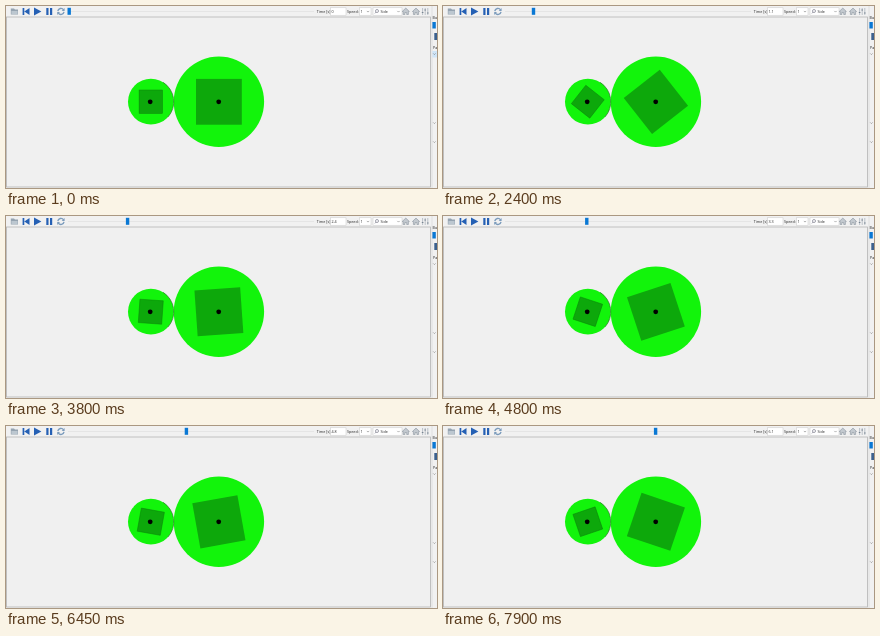
An HTML page for the animation above (8000 ms loop, 431 by 182 pixels).

```html
<!DOCTYPE html>
<html lang="en">
<head>
<meta charset="utf-8">
<title>Gear pair simulation</title>
<style>
  html, body { margin: 0; width: 100%; height: 100%; overflow: hidden; background: #f1f1f1; }
  svg { display: block; width: 431px; height: 182px; }
  text { font: 3.7px "Open Sans", "Noto Sans", sans-serif; fill: #222; }
  .field { fill: #fff; stroke: #c8c8c8; stroke-width: .5; }
  .blue { fill: #2560b4; }
  .soft { fill: #95a3b0; }
  .chevron { fill: none; stroke: #666; stroke-width: .5; }
  .disc { fill: #12f40b; }
  .block { fill: #0da80b; }
</style>
</head>
<body>
<svg viewBox="0 0 431 182">
  <defs>
    <path id="down" class="chevron" d="M-1.2-.6 0 .6 1.2-.6"/>
    <path id="house" d="M0-3.4 3.6 0H2.6V3H.9V1H-.9V3H-2.6V0H-3.6Z" fill="#c3c9cf" stroke="#8b969f" stroke-width=".6"/>
  </defs>

  <!-- viewport -->
  <rect x=".5" y="11" width="424" height="170" fill="#f0f0f0" stroke="#b4b4b4" stroke-width=".8"/>

  <!-- playback buttons -->
  <rect id="hover" x="26" y=".5" width="11" height="10" fill="#cfe5f7"/>
  <path class="soft" d="M4.8 2.5H8L9 3.5H12V8.5H4.8Z"/>
  <path d="M5.4 5H11.6V8H5.4Z" fill="#bcc7d0"/>
  <path class="blue" d="M16.6 2H18.3V9H16.6ZM23.5 2V9L18.3 5.5Z"/>
  <path class="blue" d="M28 1.6 35.4 5.5 28 9.4Z"/>
  <path class="blue" d="M40.3 2H42.5V9H40.3ZM44 2H46.2V9H44Z"/>
  <path d="M51.8 5.2A3.2 3.2 0 0 1 57.6 3.8M58 5.8A3.2 3.2 0 0 1 52.3 7.2" fill="none" stroke="#7c9cbc" stroke-width="1.4"/>
  <path d="M58.6 2V5H55.7ZM51.2 9V6H54Z" fill="#7c9cbc"/>

  <!-- time slider -->
  <path d="M62 5.5H308" stroke="#e3e3e3" stroke-width=".8"/>
  <rect id="thumb" x="-1.7" y="1.8" width="3.4" height="7" fill="#0a78d4"/>

  <!-- fields -->
  <text x="310.8" y="6.9">Time [s]</text>
  <rect class="field" x="324.6" y="1.8" width="15.4" height="7.4"/>
  <text id="clock" x="325.4" y="6.9">0</text>
  <text x="341" y="6.9">Speed:</text>
  <rect class="field" x="353.5" y="1.8" width="11.5" height="7.4"/>
  <text x="354.5" y="6.9">1</text>
  <use href="#down" x="362" y="5.5"/>
  <rect class="field" x="367" y="1.8" width="29" height="7.4"/>
  <circle cx="371" cy="5" r="1.5" fill="none" stroke="#667" stroke-width=".6"/>
  <path d="M370 6.1 368.9 7.4" stroke="#667" stroke-width=".6"/>
  <text x="374.5" y="6.9">Side</text>
  <use href="#down" x="392.5" y="5.5"/>
  <use href="#house" x="399.8" y="5.5"/>
  <use href="#house" x="410" y="5.5"/>
  <path d="M416.6 2V9M419.2 2V9M421.8 2V9" stroke="#a3adb6" stroke-width=".7"/>
  <path d="M415.8 6.5H417.4M418.4 4H420M421 7H422.6" stroke="#76838f" stroke-width="1"/>

  <!-- side panel -->
  <path d="M426 0V182" stroke="#d4d4d4" stroke-width=".6"/>
  <text x="426.5" y="12.6">Bar</text>
  <rect x="426.4" y="16" width="3.4" height="6.5" fill="#0a78d4"/>
  <rect x="428.3" y="27" width="2.7" height="7" fill="#3d618d"/>
  <text x="427" y="42.8">Parts</text>
  <rect id="row" x="426.4" y="45" width="4.6" height="6.5" fill="#cfe5f7"/>
  <use href="#down" x="428.4" y="48"/>
  <use href="#down" x="428.4" y="117"/>
  <use href="#down" x="428.4" y="136"/>

  <!-- gears -->
  <circle class="disc" cx="144.9" cy="95.7" r="22.9"/>
  <circle class="disc" cx="212.9" cy="95.8" r="45.2"/>
  <path d="M157 76.3A22.9 22.9 0 0 1 162 111" fill="none" stroke="#246b20" stroke-width=".6"/>
  <rect id="small" class="block" x="-11.7" y="-11.7" width="23.4" height="23.4" stroke="#0a840a" stroke-width=".5"/>
  <rect id="large" class="block" x="-22.9" y="-22.9" width="45.8" height="45.8"/>
  <circle cx="144.2" cy="95.8" r="2.4"/>
  <circle cx="212.7" cy="95.8" r="2.4"/>

  <path id="cursor" d="M0 0V9L2.1 7.1 3.6 10.4 4.9 9.8 3.5 6.6H6.3Z" fill="#fff" stroke="#222" stroke-width=".5"/>
</svg>
<script>
  const LOOP = 8000, STEP = 50, START = 1170;
  const SPIN = 104.2;   // degrees per second
  const SLIDE = 22.2;   // pixels per second
  const RATE = 0.907;   // simulated seconds per second
  const STALLS = [[1800, 1950], [2750, 2850], [3800, 3950], [4000, 4150], [5100, 5250], [6900, 7000]];

  const el = id => document.getElementById(id);
  const place = (id, x, y, turn = 0) =>
    el(id).setAttribute("transform", `translate(${x} ${y}) rotate(${turn})`);
  const show = (id, on) => el(id).style.display = on ? "" : "none";
  const clamp = v => Math.min(1, Math.max(0, v));
  const ease = v => v * v * (3 - 2 * v);

  function sample(ms) {
    const t = Math.floor(ms / STEP) * STEP;
    const stall = STALLS.find(([from, to]) => t >= from && t < to);
    return stall ? stall[0] : t;
  }

  function draw(ms) {
    const t = sample(ms);
    const run = Math.max(0, t - START) / 1000;
    place("small", 144.8, 95.7, SPIN * run);
    place("large", 212.9, 95.8, -SPIN * run);
    place("thumb", 63.2 + SLIDE * run, 0);
    el("clock").textContent = run ? (RATE * run).toFixed(1) : "0";

    // pointer travels to the play button, then leaves upwards
    const go = ease(clamp((t - 200) / 550));
    const out = clamp((t - 900) / 250);
    place("cursor", 132 - 101 * go, 147 - 142 * go - 18 * out);
    show("cursor", t >= 200 && t < 1150);
    show("hover", t >= 700 && t < 1050);
    show("row", t < 900);
  }

  function tick(now) {
    draw(now % LOOP);
    requestAnimationFrame(tick);
  }
  draw(0);
  requestAnimationFrame(tick);
</script>
</body>
</html>
```
